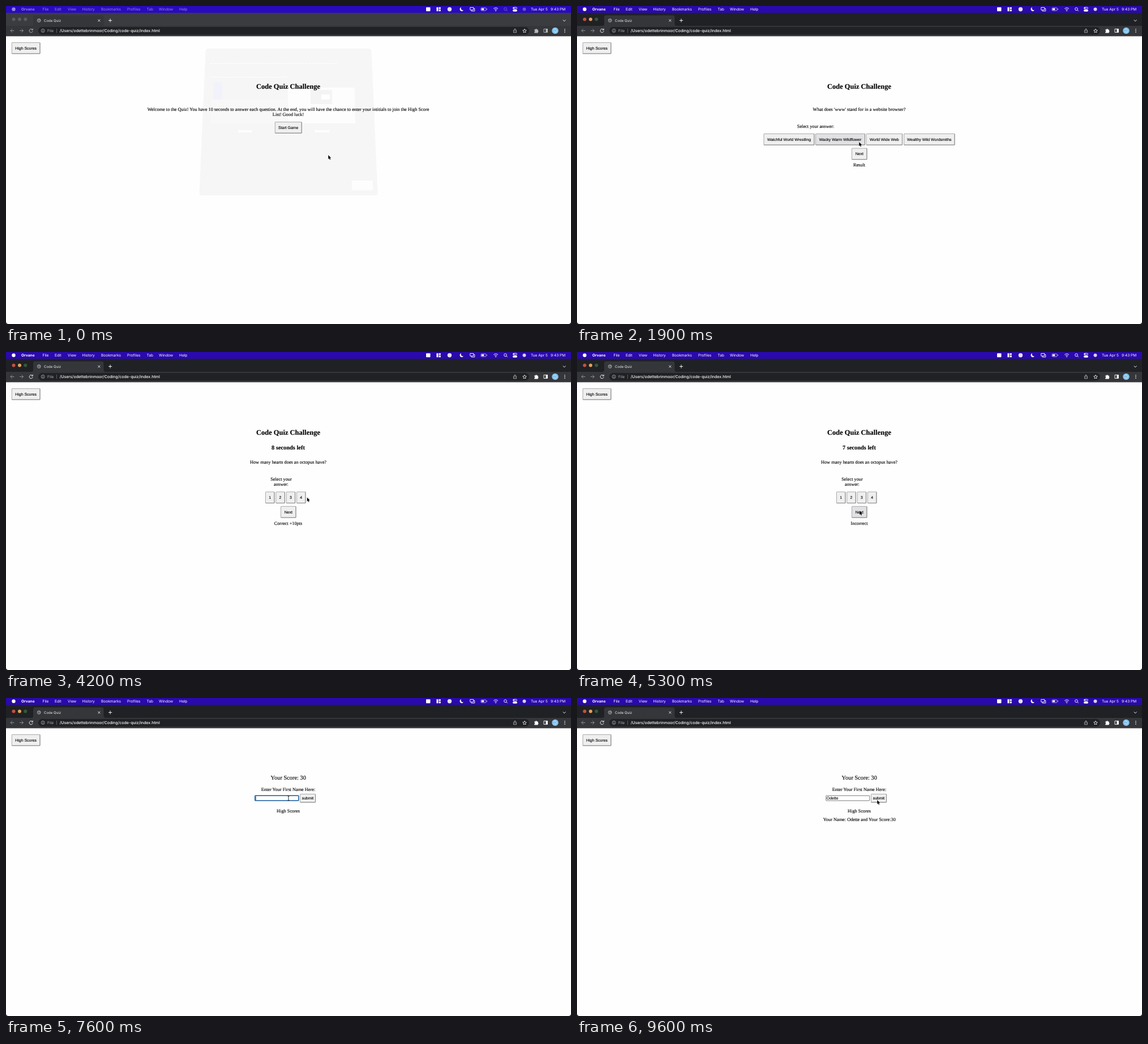
These frames come from a looping animation (998 px wide and 561 px high, 9900 ms). An HTML page:

```html
<!DOCTYPE html>
<html lang="en">
<head>
<meta charset="utf-8">
<title>Code Quiz</title>
<style>
html, body { margin: 0; width: 100%; height: 100%; overflow: hidden; background: #fefefe; }
svg { display: block; width: 998px; height: 561px; }
text { white-space: pre; text-rendering: geometricPrecision; }
.ui { font-family: Inter, sans-serif; }
.page { font: 8.317px "Liberation Serif", Times, serif; fill: #000; }
.page text { stroke: #000; stroke-width: .12; }
.page .btn, .page .field { font: 6.93px "Liberation Sans", Arial, sans-serif; }
.title { font-size: 12.475px; font-weight: bold; }
.timer { font-size: 10.396px; font-weight: bold; }
.score { font-size: 10.396px; }
.mid { text-anchor: middle; }
.line { fill: none; stroke: #fff; stroke-width: .9; }
</style>
</head>
<body>
<svg viewBox="0 0 998 561">
  <rect width="998" height="561" fill="#fefefe"/>
  <g id="page" class="page"></g>
  <g class="ui">
    <rect id="strip" width="998" height="53"/>
    <rect id="bar" width="998" height="12"/>
    <path d="M0 53V35H45Q48 35 48 32V20Q48 16.500 51.500 16.500H169Q172.500 16.500 172.500 20V32Q172.500 35 175.500 35H998V53Z" fill="#35363a"/>
    <rect x="57" y="37" width="867" height="13.500" rx="6.700" fill="#202124"/>
    <path d="M0 53.300H998" stroke="#5b5c5f" stroke-width=".6"/>
    <g id="menu" fill="#fff" font-size="6.6"></g>
    <g id="status" fill="#fff" font-size="6.5">
      <rect x="742" y="2.300" width="7.500" height="7" rx="1"/>
      <path d="M760.500 2.300h3v7h-3zM764.600 2.300h3.200v3h-3.200zM764.600 6.200h3.200v3.100h-3.200z"/>
      <circle cx="783.500" cy="5.800" r="3.700" fill="#e4e0f5"/>
      <path d="M804 2.300a3.500 3.500 0 1 0 4 5.200a3.600 3.600 0 0 1-4-5.200z"/>
      <path class="line" d="M819.800 2.500h6v4.500h-6zM822 7v2h5.800v-4.500h-2"/>
      <rect class="line" x="839" y="3.200" width="9" height="5" rx="1.300" style="stroke-width:.6"/>
      <path d="M840 4.200h4.300v3H840zM849 4.800h.8v1.800H849z"/>
      <path class="line" d="M861.200 4.800q3.900-3.500 7.800 0M862.800 6.600q2.300-2 4.600 0"/>
      <circle cx="865.100" cy="8.300" r=".9"/>
      <g id="dim"><circle class="line" cx="882" cy="5.300" r="2.400"/><path class="line" d="M883.800 7.100l2 2"/>
      <circle cx="915.500" cy="5.800" r="3" fill="#d5d2ea"/></g>
      <rect class="line" x="895.500" y="2.300" width="7" height="2.700" rx="1.300"/>
      <rect x="895" y="6.200" width="8" height="3.500" rx="1.700"/>
      <circle cx="897" cy="3.600" r="1"/>
      <text x="927" y="8.200">Tue Apr 5</text>
      <text x="988" y="8.200" text-anchor="end">9:43 PM</text>
    </g>
    <g id="lights"><circle cx="13.500" cy="23.500" r="3"/><circle cx="24" cy="23.500" r="3"/><circle cx="34.300" cy="23.500" r="3"/></g>
    <circle cx="58.200" cy="25.500" r="2.900" fill="none" stroke="#c8cacd" stroke-width=".8"/>
    <path d="M56 24l2 1 .4 2.500M59 22.800l.2 2 1.800.6" class="line" style="stroke:#c8cacd;stroke-width:.7"/>
    <text x="67" y="27.800" font-size="6.100" fill="#eceef0">Code Quiz</text>
    <path class="line" d="M162.500 23.700l3.800 3.800m0-3.800l-3.800 3.800M181 25.500h6.200M184.100 22.400v6.200"/>
    <path class="line" d="M983.700 24.500l2.500 2.300 2.500-2.300"/>
    <g class="line">
      <path d="M14.500 43.500h-6.500m3-3l-3 3 3 3M24 43.500h6.500m-3-3l3 3-3 3" stroke="#96989c"/>
      <g id="nav"><path d="M46.500 41.500a3.100 3.100 0 1 0 .8 2.700M47.300 39.800v2.400h-2.500"/></g>
      <circle cx="65.200" cy="43.500" r="3" stroke="#c8cacd" stroke-width=".7"/>
      <path d="M65.200 43v2.200M65.200 41.500v.7" stroke="#c8cacd"/>
      <path d="M89.500 39.800v7.500" stroke="#85878b" stroke-width=".6"/>
      <path d="M897.500 42.500h-1v4.300h5v-4.300h-1M899 45v-5m-1.500 1.500l1.500-1.500 1.500 1.500" stroke="#d5d7da" stroke-width=".7"/>
      <path d="M916 40.500l1 2.100 2.300.3-1.700 1.600.4 2.300-2-1.100-2 1.100.4-2.300-1.700-1.600 2.300-.3z" stroke-width=".8"/>
    </g>
    <text x="73" y="46" font-size="6.700" fill="#aeb1b6">File</text>
    <text x="94.700" y="46" font-size="7" font-weight="500" fill="#fff">/Users/odettebrinmoor/Coding/code-quiz/index.html</text>
    <g id="tools" fill="#fff">
      <path d="M933.300 41.500h2a1.200 1.200 0 0 1 2.400 0h2v2a1.200 1.200 0 0 1 0 2.300v1.700h-6.400v-2a1.100 1.100 0 0 0 0-2.200z"/>
      <path class="line" d="M950 40.500h6.500v6h-6.500z"/><path d="M953.500 40.500h3v6h-3z"/>
    </g>
    <circle cx="970" cy="43.500" r="5.800" fill="#83c0ea"/>
    <path class="line" d="M967 42l3-2 3 3.500-2 3M967 44.500l4 2" style="stroke:#d9eefb;stroke-width:.8"/>
    <g fill="#fff"><circle cx="987" cy="41" r=".8"/><circle cx="987" cy="43.600" r=".8"/><circle cx="987" cy="46.200" r=".8"/></g>
  </g>
  <path d="M0 556.500Q0 561 4.500 561H0ZM998 556.500Q998 561 993.500 561H998Z" fill="#000"/>
  <g id="pointer"></g>
</svg>
<script>
const LOOP = 9900, STEP = 100;
const $ = id => document.getElementById(id);

const menu = [[27, 'Orvane'], [64.5, 'File'], [86, 'Edit'], [109, 'View'], [134.5, 'History'],
  [168, 'Bookmarks'], [214, 'Profiles'], [248.5, 'Tab'], [270, 'Window'], [306, 'Help']];
$('menu').innerHTML = '<circle cx="13.500" cy="5.700" r="3.200"/>' + menu.map(([x, s], i) =>
  `<text x="${x}" y="8.200" font-weight="${i ? 400 : 700}">${s}</text>`).join('');

// Each answer: left, width, label
const quiz = [
  { from: 1500, hit: 2300, done: 'Correct +10 pts', ask: "What does 'www' stand for in a website browser?",
    label: 421.5, options: [[330, 89, 'Watchful World Wrestling'], [421.5, 87, 'Wacky Warm Wildflower'],
      [511, 63.5, 'World Wide Web'], [577.5, 89.5, 'Wealthy Wild Wordsmiths']] },
  { from: 2900, hit: 3400, done: 'Correct +10pts', ask: 'What is the name of the largest ocean on Earth?',
    label: 472.5, options: [[431.5, 34, 'Atlantic'], [468.5, 32.5, 'Pacific'], [503.5, 31, 'Indian'], [537, 29, 'Arctic']] },
  { from: 3700, hit: 4900, done: 'Incorrect', ask: 'How many hearts does an octopus have?', tall: true,
    label: 486, options: [[458.5, 15.5, '1'], [476.8, 15.5, '2'], [495.2, 15.5, '3'], [513.5, 15.5, '4']] },
  { from: 5500, hit: 6600, done: 'Correct +10pts', ask: 'Sodium bicarbonate is a staple in most kitchens. What is its other name?',
    label: 469, options: [[424, 36, 'Vinegar'], [462.5, 51, 'Baking Soda'], [516.5, 30, 'Sugar'], [549.5, 24, 'Salt']] }
];
const END = 7200, FOCUS = 7600, TYPE = 8000, SUBMIT = 9600, TICK = 2500;
const NAME = 'Odette';

// Pointer stops: time, x, y
const path = [[0, 571, 267], [800, 571, 267], [1400, 502, 217], [1600, 500, 218], [1900, 500, 244],
  [2200, 542, 240], [2400, 541, 243], [2800, 501, 275], [2900, 500, 276], [3200, 489, 254.5],
  [3400, 490, 255], [3600, 501, 276], [3700, 501, 277], [4000, 516, 259], [4200, 533.5, 260.5],
  [4300, 535, 261], [4500, 535, 261], [4800, 522, 261], [4900, 522, 262], [5300, 501, 284],
  [5500, 500, 283], [6300, 503.5, 257], [6600, 501, 256], [7000, 500, 275], [7200, 500, 273],
  [7500, 499, 177], [8900, 499, 177], [9500, 532, 184], [9900, 532, 184]];

function mouse(t) {
  const i = Math.max(1, path.findIndex(p => p[0] >= t));
  const [t0, x0, y0] = path[i - 1], [t1, x1, y1] = path[i];
  const u = (t - t0) / (t1 - t0), e = u * u * (3 - 2 * u);
  return [x0 + (x1 - x0) * e, y0 + (y1 - y0) * e];
}

const text = (x, y, s, c = '') => `<text class="mid ${c}" x="${x}" y="${y}">${s}</text>`;

function button(x, y, w, h, s, m) {
  const over = m[0] > x && m[0] < x + w && m[1] > y && m[1] < y + h;
  return `<rect x="${x}" y="${y}" width="${w}" height="${h}" rx=".6" fill="${over ? '#e1e1e4' : '#efefef'}" stroke="#8a8a8a" stroke-width=".7"/>` +
    `<path d="M${x} ${y + h}h${w}v${-h}" fill="none" stroke="#666" stroke-width=".6"/>` +
    text(x + w / 2, y + h / 2 + 2.4, s, 'btn');
}

function ghost(a) {
  return `<g opacity="${a}"><path d="M358 75H640Q645 75 645.500 80L656.500 330Q656.500 334 652.500 334H345.500Q341.500 334 341.500 330L352.500 80Q353 75 358 75Z" fill="#f6f6f6"/>
    <path d="M360 125.500H497M360 101.500H585" stroke="#fff" stroke-dasharray="5 1"/>
    <path d="M366 135h16v30h-16z" fill="#f2f2fa"/><path d="M362 165H497V207H362Z" fill="#f8f8f8"/>
    <path d="M498 144H616L617 207H498ZM611 308h37v17h-37zM410 219h24v4h-24zM545 219h26v4h-26z" fill="#fdfdfd"/>
    <path d="M538 148h38v25h-38z" fill="#f4f4f4"/><path d="M557 156h15v9h-15z" fill="#fff"/></g>`;
}

function welcome(t, m) {
  const fade = t < 200 ? 1 : Math.max(0, 1 - t / 500);
  return (fade ? ghost(fade) : '') + text(498.5, 146.2, 'Code Quiz Challenge', 'title') +
    text(498.5, 185, 'Welcome to the Quiz! You have 10 seconds to answer each question. At the end, you will have the chance to enter your intitials to join the High Score') +
    text(498.5, 194.4, 'List! Good luck!') + button(475.3, 204.7, 46.9, 19.5, 'Start Game', m);
}

function question(t, m) {
  const n = quiz.findLastIndex(q => t >= q.from), q = quiz[n];
  const result = t >= q.hit ? q.done : n ? quiz[n - 1].done : 'Result';
  const timed = t >= TICK, y = timed ? 12 : 0, b = y + (q.tall ? 9.4 : 0);
  let s = text(498.5, 146.2, 'Code Quiz Challenge', 'title');
  if (timed) s += text(498.5, 171.6, 9 - Math.floor((t - TICK) / 1000) + ' seconds left', 'timer');
  s += text(498.5, 185 + y, q.ask);
  s += q.tall ? text(q.label, 215 + y, 'Select your') + text(q.label, 224.4 + y, 'answer:')
    : text(q.label, 215 + y, 'Select your answer:');
  for (const [x, w, label] of q.options) s += button(x, 225.4 + b, w, 19.7, label, m);
  return s + button(485.5, 251 + b, 26.5, 19.7, 'Next', m) + text(498.5, 283.3 + b, result);
}

function results(t, m) {
  const focus = t >= FOCUS && t < 9500;
  const typed = t < TYPE ? 0 : Math.min(NAME.length, (t - TYPE) / STEP + 1);
  let s = text(498.8, 144.2, 'Your Score: 30', 'score') + text(498.5, 164.4, 'Enter Your First Name Here:') +
    `<rect x="439.800" y="172.300" width="77" height="8.800" rx=".8" fill="#fff" stroke="${focus ? '#15599c' : '#6e6e6e'}" stroke-width="${focus ? 1.5 : .9}"/>` +
    `<text class="field" x="440.800" y="179">${NAME.slice(0, typed)}</text>`;
  if (focus && t < 8600) s += '<path id="caret" stroke="#000" stroke-width=".7"/>';
  s += button(519.5, 169.5, 27, 14.5, 'submit', m) + text(498.5, 201.8, 'High Scores');
  if (t >= SUBMIT) s += text(498.8, 216.5, `Your Name: ${NAME} and Your Score:30`);
  return s;
}

function pointer(t, [x, y]) {
  if (t >= TYPE && t < 9000) return '';
  if (t > END && x < 517 && y > 172 && y < 181.5)
    return `<path d="M${x - 1.5} ${y - 4}q1.500 0 1.500 1.200v5.600q0 1.200-1.500 1.200m3-8q-1.500 0-1.500 1.200m0 5.600q0 1.200 1.500 1.200" fill="none" stroke="#111" stroke-width=".9"/>`;
  return `<path d="M${x - 1.7} ${y - 4}v7.200l1.600-1.500 1.100 2.500 1.200-.5-1.100-2.400h2.200z" fill="#000" stroke="#fff" stroke-width=".5" paint-order="stroke"/>`;
}

function draw(t) {
  const m = mouse(t), active = t >= 300;
  const scene = t < quiz[0].from ? welcome : t < END ? question : results;
  $('page').innerHTML = button(10.3, 64.6, 49.7, 19.4, 'High Scores', m) + scene(t, m);
  const caret = $('caret'), field = $('page').querySelector('.field');
  if (caret) {
    const w = field.textContent ? field.getComputedTextLength() : 0;
    caret.setAttribute('d', `M${441.2 + w} 173.500v6.500`);
  }
  $('pointer').innerHTML = pointer(t, m);
  $('strip').setAttribute('fill', active ? '#202124' : '#3a3c40');
  $('bar').setAttribute('fill', active ? '#2a09ad' : '#2a0abe');
  $('menu').style.opacity = active ? 1 : .5;
  $('dim').style.opacity = active ? 1 : .35;
  $('nav').style.opacity = $('tools').style.opacity = active ? 1 : .65;
  const colours = active ? ['#c4523f', '#e3a15f', '#33583c'] : ['#5a5c60', '#5a5c60', '#5a5c60'];
  [...$('lights').children].forEach((c, i) => c.setAttribute('fill', colours[i]));
}

let last = -1;
const start = performance.now();
function frame() {
  const t = Math.floor((performance.now() - start) % LOOP / STEP) * STEP;
  if (t !== last) draw(last = t);
  requestAnimationFrame(frame);
}
draw(0);
frame();
</script>
</body>
</html>
```
